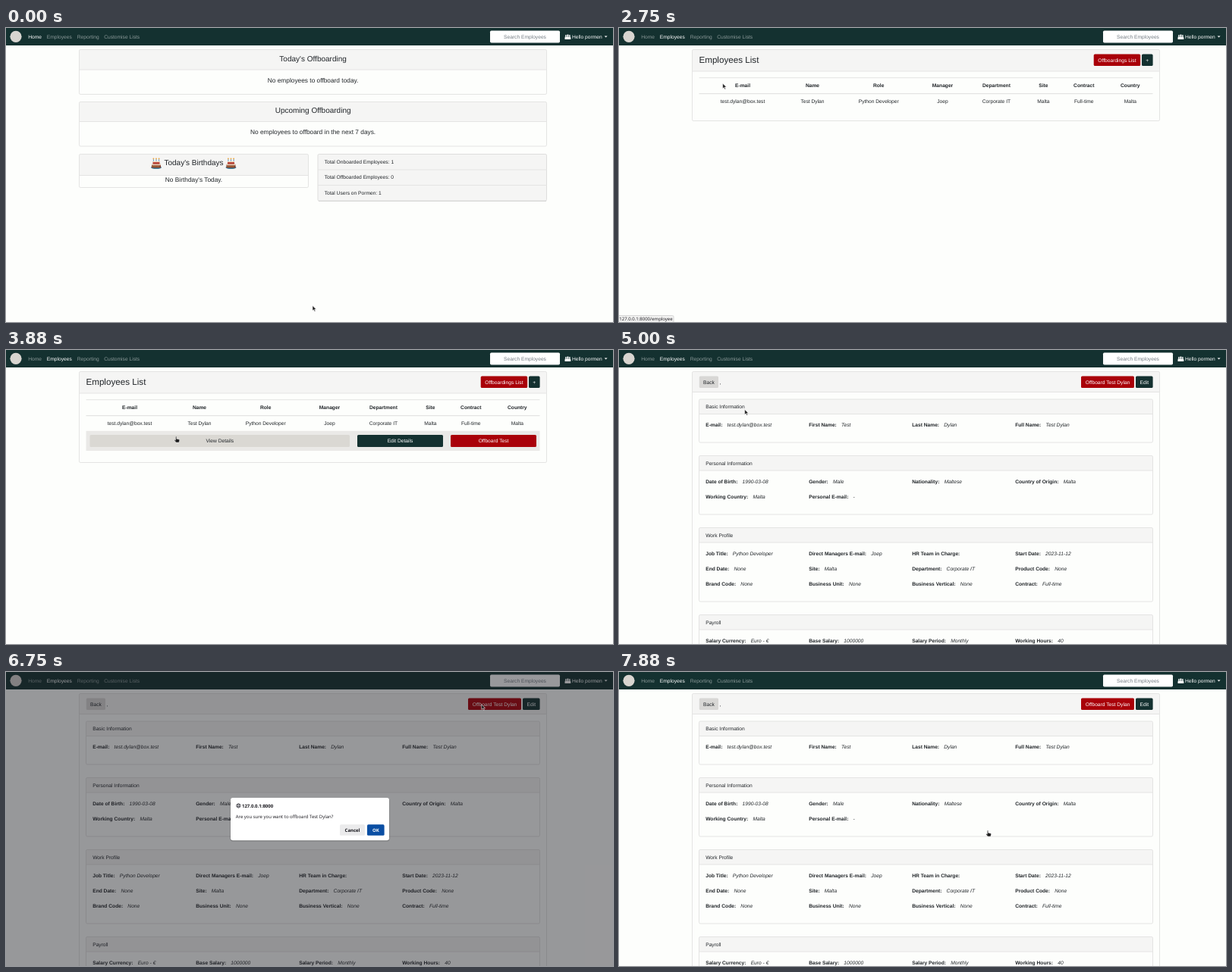
Animation of 800x388 px, one loop 8 s. Source, as an HTML page:

```html
<!DOCTYPE html>
<html lang="en">
<head>
<meta charset="utf-8">
<title>Employee offboarding</title>
<style>
  html, body { margin: 0; width: 100%; height: 100%; overflow: hidden; background: #fdfefc; }
  svg { display: block; width: 800px; height: 388px; }
  text { font-family: "Liberation Sans", Arial, sans-serif; font-size: 6.667px; fill: #212529;
         text-rendering: geometricPrecision; white-space: pre; }
  .mid { text-anchor: middle; }
  .b { font-weight: 700; }
  .i { font-style: italic; }
  .h4 { font-size: 10px; }
  .h3 { font-size: 11.667px; }
  .lead { font-size: 8.333px; }
  .white { fill: #fff; }
  .ui { font-family: "Open Sans", "Noto Sans", sans-serif; font-size: 6px; fill: #15141a; }
  .nav { fill: #fff; fill-opacity: .5; }
  .nav.hover { fill-opacity: .75; }
  .nav.on { fill-opacity: 1; }
</style>
</head>
<body>
<svg id="stage" viewBox="0 0 800 388"></svg>
<script>
const DARK = '#143130', RED = '#a90009', LINE = '#e4e4e3', HEAD = '#f5f5f4', PAGE = '#fdfefc';
const PERSON = 'Test Dylan', MAIL = 'test.dylan@box.test', BOSS = 'Joep';

const text = (x, y, s, cls = '') => `<text x="${x}" y="${y}" class="${cls}">${s}</text>`;
const rect = (x, y, w, h, fill, r = 0, more = '') =>
  `<rect x="${x}" y="${y}" width="${w}" height="${h}" rx="${r}" fill="${fill}" ${more}/>`;
const line = (x1, x2, y, w = 1) => `<path d="M${x1} ${y}H${x2}" stroke="${LINE}" stroke-width="${w}"/>`;
const group = (id, body, more = '') => `<g id="${id}" ${more}>${body}</g>`;

function card(x1, y1, x2, y2, headY) {
  const w = x2 - x1;
  return rect(x1, y1, w, y2 - y1, PAGE, 1.7) +
    rect(x1, y1, w, headY - y1, HEAD, 1.7) + line(x1, x2, headY) +
    rect(x1, y1, w, y2 - y1, 'none', 1.7, `stroke="${LINE}"`);
}

function button(x1, x2, label, fill, cls = 'white', y = 34.5, h = 15.5) {
  return rect(x1, y, x2 - x1, h, fill, 1.6) + text((x1 + x2) / 2, y + h / 2 + 2.4, label, 'mid ' + cls);
}

function cake(x) {
  const candles = [3.4, 7, 10.6].map(cx =>
    rect(cx - .5, 2.2, 1, 3.2, '#5b9cc4') + `<circle cx="${cx}" cy="1.4" r=".9" fill="#f0a53a"/>`).join('');
  return `<g transform="translate(${x} 171)">${candles}
    <ellipse cx="7" cy="13" rx="7" ry="2" fill="#3d7f9b"/>
    ${rect(1, 8.6, 12, 5, '#7d3a2c', 1.2)}${rect(1, 8.4, 12, 1.8, '#f2dcc0', .8)}
    ${rect(2.5, 5, 9, 3.8, '#b9483c', 1)}${rect(2.5, 4.8, 9, 1.3, '#f2dcc0', .6)}
    <path d="M2 11.8H12" stroke="#e8b64c" stroke-dasharray="1 1"/></g>`;
}

function userIcon(x, y) {
  const one = (dx, r, h) => `<circle cx="${dx}" cy="${-h}" r="${r}"/><path d="M${dx - r - .5} 3v-2q0-2 ${r + .5}-2t${r + .5} 2v2z"/>`;
  return `<g transform="translate(${x} ${y})" fill="#fff">${one(-2.5, .9, 2)}${one(2.5, .9, 2)}${one(0, 1.2, 2.3)}</g>`;
}

function navBar() {
  const links = [[29.2, 'Home', 'navHome'], [53.8, 'Employees', 'navStaff'], [93.8, 'Reporting', ''], [129.2, 'Customise Lists', '']];
  return rect(0, 0, 800, 23, DARK) +
    '<circle cx="13" cy="11.3" r="7.6" fill="#d8d5d0"/>' +
    links.map(([x, s, id]) => `<text x="${x}" y="14" class="nav" id="${id}">${s}</text>`).join('') +
    rect(638, 3.5, 92, 16, '#fff', 1.7) +
    `<text x="684" y="14" class="mid" style="fill:#747c83">Search Employees</text>` +
    userIcon(740.4, 12) + text(746, 14, 'Hello pormen', 'white') +
    '<path d="M788.6 10.6h4l-2 2z" fill="#fff"/>';
}

function homePage() {
  const stats = ['Total Onboarded Employees: 1', 'Total Offboarded Employees: 0', 'Total Users on Pormen: 1'];
  return card(96.5, 28.5, 712.5, 87.5, 55) +
    text(404.6, 43.7, 'Today\'s Offboarding', 'mid h4') +
    text(404.6, 71.8, 'No employees to offboard today.', 'mid lead') +
    card(96.5, 97.5, 712.5, 156, 123.5) +
    text(404.6, 112.3, 'Upcoming Offboarding', 'mid h4') +
    text(404.6, 140.3, 'No employees to offboard in the next 7 days.', 'mid lead') +
    card(96.5, 166.5, 398.5, 210.5, 194.5) +
    cake(191) + text(247.5, 181.3, 'Today\'s Birthdays', 'mid h4') + cake(289.5) +
    text(247.5, 203, 'No Birthday\'s Today.', 'mid lead') +
    rect(411, 166.5, 301.5, 61.7, HEAD, 1.7, 'stroke="#dededd"') +
    line(411, 712.5, 187) + line(411, 712.5, 207.5) +
    '<path d="M412 228.3H712" stroke="#d2d2d1"/>' +
    stats.map((s, i) => text(419.7, 178.8 + i * 20.5, s)).join('');
}

function listPage() {
  const cols = [
    [163, 'E-mail', MAIL], [255, 'Name', PERSON], [342.2, 'Role', 'Python Developer'],
    [426.5, 'Manager', BOSS], [497.4, 'Department', 'Corporate IT'], [559.3, 'Site', 'Malta'],
    [612.8, 'Contract', 'Full-time'], [673.8, 'Country', 'Malta']];
  const frame = (id, bottom) => group(id, card(96.5, 28.5, 712.5, bottom, 57));
  const actions = rect(105.5, 106.8, 598, 26.2, '#eae9e7') +
    button(110.5, 453, 'View Details', '#dad8d3', '', 112, 16) +
    button(463, 576, 'Edit Details', DARK, 'white', 112, 16) +
    button(586, 699, 'Offboard Test', RED, 'white', 112, 16);
  return frame('short', 122.5) + frame('tall', 148.5) +
    text(105.4, 45.8, 'Employees List', 'h3') +
    button(625.7, 687.2, 'Offboardings List', RED) + button(689, 703.6, '+', DARK) +
    line(105.5, 703.5, 65.7) + line(105.5, 703.5, 86.6, 1.3) +
    cols.map(([x, h, v]) => text(x, 78.3, h, 'mid b') + text(x, 99.3, v, 'mid')).join('') +
    group('actions', actions);
}

function detailPage() {
  const sections = [
    ['Basic Information', 65, 122, [
      ['E-mail', MAIL, 'First Name', 'Test', 'Last Name', 'Dylan', 'Full Name', PERSON]]],
    ['Personal Information', 139.5, 217, [
      ['Date of Birth', '1990-03-08', 'Gender', 'Male', 'Nationality', 'Maltese', 'Country of Origin', 'Malta'],
      ['Working Country', 'Malta', 'Personal E-mail', '-']]],
    ['Work Profile', 234.5, 332, [
      ['Job Title', 'Python Developer', 'Direct Managers E-mail', BOSS, 'HR Team in Charge', '', 'Start Date', '2023-11-12'],
      ['End Date', 'None', 'Site', 'Malta', 'Department', 'Corporate IT', 'Product Code', 'None'],
      ['Brand Code', 'None', 'Business Unit', 'None', 'Business Vertical', 'None', 'Contract', 'Full-time']]],
    ['Payroll', 349.5, 430, [
      ['Salary Currency', 'Euro - €', 'Base Salary', '1000000', 'Salary Period', 'Monthly', 'Working Hours', '40']]]];
  const field = (x, y, k, v) =>
    text(x, y, `<tspan class="b">${k}:</tspan><tspan class="i" dx="6.2">${v}</tspan>`);
  const section = ([title, y1, y2, rows]) =>
    card(105.5, y1, 703.5, y2, y1 + 19.5) + text(114.2, y1 + 12.4, title) +
    rows.map((row, r) => [0, 1, 2, 3].filter(c => row[c * 2]).map(c =>
      field(114.2 + c * 136, y1 + 36.3 + r * 20.1, row[c * 2], row[c * 2 + 1])).join('')).join('');
  return card(96.5, 28.5, 712.5, 450, 55.5) +
    button(105.8, 131, 'Back', '#d8d7d5', '') + text(132.8, 44.8, ',') +
    button(609, 679, 'Offboard ' + PERSON, RED) + button(681, 703.6, 'Edit', DARK) +
    sections.map(section).join('');
}

function dialogBox() {
  return rect(0, 0, 800, 388, '#1c1b22', 0, 'fill-opacity=".45"') +
    rect(295.5, 166.5, 210, 57, '#000', 3.5, 'fill-opacity=".2"') +
    rect(296, 166, 209, 56.3, '#fff', 3) +
    `<g fill="none" stroke="#2b2a33" stroke-width=".6"><circle cx="306.4" cy="176.4" r="2.7"/>
     <ellipse cx="306.4" cy="176.4" rx="1.2" ry="2.7"/><path d="M303.7 175.4h5.4M303.7 177.5h5.4"/></g>` +
    text(311, 178.6, '127.0.0.1:8000', 'ui b') +
    text(302.8, 193.2, `Are you sure you want to offboard ${PERSON}?`, 'ui') +
    button(440, 473, 'Cancel', '#ebebec', 'ui b', 201.3, 14.5) +
    button(476, 498.6, 'OK', '#0a4ea3', 'ui b white', 201.3, 14.5).replace('class="mid ui b white"', 'class="mid ui b" style="fill:#fff"');
}

const statusBar = rect(-2, 379.5, 74, 12, '#f1f1f0', 1.5, 'stroke="#cfcfce" stroke-width=".8"') +
  text(.3, 386.3, '127.0.0.1:8000/employee', 'ui');
const arrow = '<path d="M0 0V6.6L1.6 5.2 2.7 7.7 3.8 7.2 2.7 4.8H4.8Z" fill="#1d1d1d" stroke="#fff" stroke-width=".5"/>';
const hand = `<path d="M0 .4Q.7-.3 1.2.5V3.2L4.6 4Q5.2 4.4 5 5.4L4.4 8H.6L-1.6 5.2Q-1.7 4.4-.9 4.6L0 5.2Z"
  fill="#1d1d1d" stroke="#fff" stroke-width=".4"/>`;

const stage = document.getElementById('stage');
stage.innerHTML = rect(0, 0, 800, 388, PAGE) +
  group('home', homePage()) + group('list', listPage()) + group('detail', detailPage()) +
  navBar() + group('status', statusBar) + group('dialog', dialogBox()) +
  group('pointer', group('arrow', arrow) + group('hand', hand));

const el = {};
stage.querySelectorAll('[id]').forEach(n => { if (n.id) el[n.id] = n; });
const show = (id, on) => { el[id].style.display = on ? '' : 'none'; };

// Pointer stops: time, x, y
const track = [
  [0, 404, 366.5], [250, 404, 366.5], [1125, 70, 9], [2375, 70, 9], [2750, 136.7, 73.2],
  [3250, 202, 96], [3375, 202, 96], [3875, 223.6, 114], [4625, 223.6, 114], [5000, 165.7, 78.6],
  [5500, 118, 374], [6250, 626.7, 42.8], [6750, 626.7, 42.8], [7375, 485.4, 209], [8000, 485.4, 209]];
const handTimes = [[1125, 2500], [3125, 4250], [6250, 6750], [7875, 8000]];
const LOOP = 8000, STEP = 125;
const within = (t, a, b) => t >= a && t < b;

function pointerAt(t) {
  const i = track.findIndex((p, k) => k && t <= p[0]);
  const [t0, x0, y0] = track[i - 1], [t1, x1, y1] = track[i];
  const u = (t - t0) / (t1 - t0), e = u * u * (3 - 2 * u);
  return [x0 + (x1 - x0) * e, y0 + (y1 - y0) * e];
}

function draw(now) {
  const t = Math.floor((now % LOOP) / STEP) * STEP;
  const open = within(t, 3500, 4250), atHome = t < 2000;
  show('home', atHome);
  show('list', within(t, 2000, 4250));
  show('short', !open);
  show('tall', open);
  show('actions', open);
  show('detail', t >= 4250);
  show('status', within(t, 1250, 2875));
  show('dialog', within(t, 6750, 7875));
  el.navHome.setAttribute('class', atHome ? 'nav on' : 'nav');
  el.navStaff.setAttribute('class', !atHome ? 'nav on' : t >= 1125 ? 'nav hover' : 'nav');
  const isHand = handTimes.some(([a, b]) => within(t, a, b));
  show('hand', isHand);
  show('arrow', !isHand);
  const [x, y] = pointerAt(t);
  el.pointer.setAttribute('transform', `translate(${x.toFixed(2)} ${y.toFixed(2)})`);
}

const start = performance.now();
function tick() {
  draw(performance.now() - start);
  requestAnimationFrame(tick);
}
tick();
</script>
</body>
</html>
```
